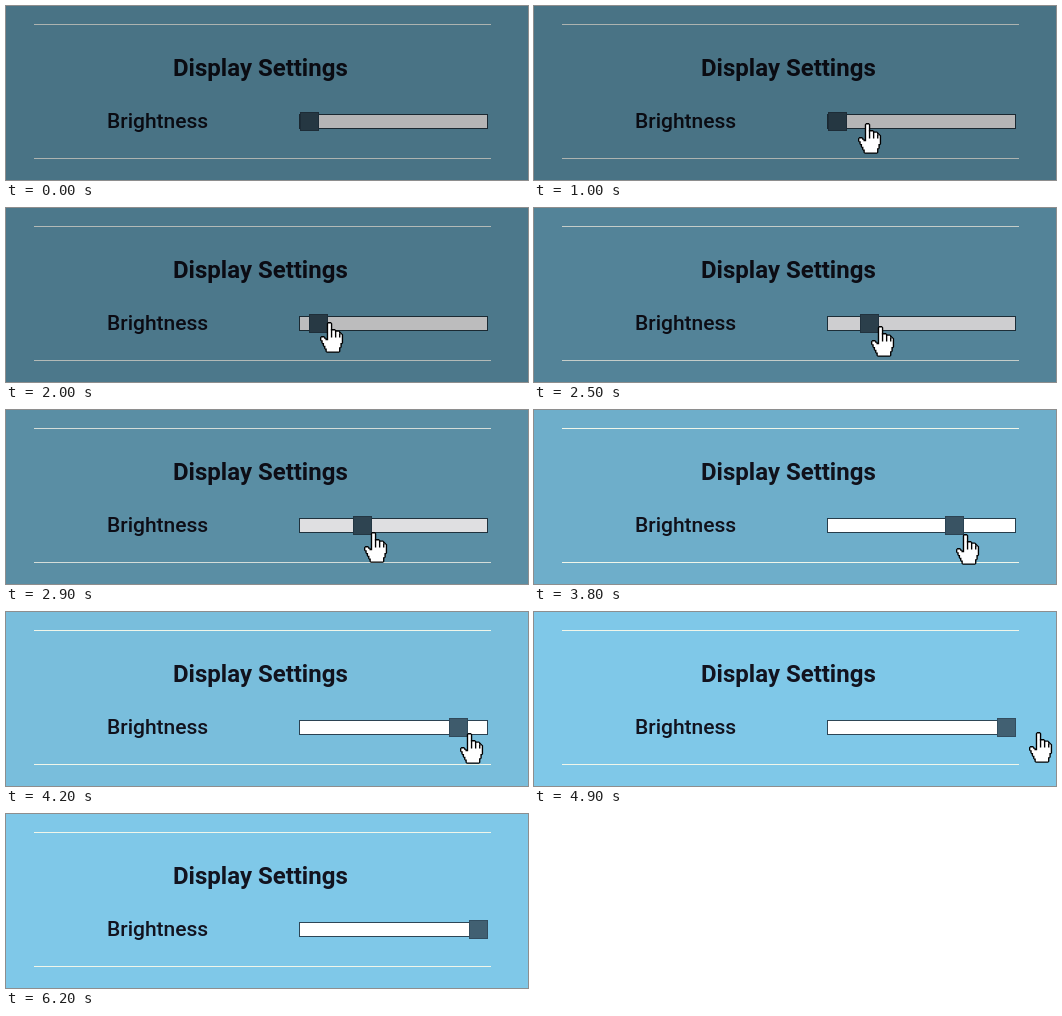
An HTML page for the animation above (6.9 s loop, 522 by 174 pixels).

```html
<!DOCTYPE html>
<html lang="en">
<head>
<meta charset="utf-8">
<title>Display Settings</title>
<style>
  html, body { margin: 0; width: 100%; height: 100%; overflow: hidden; }
  svg { display: block; width: 522px; height: 174px; }
  text { font-family: Roboto, "Liberation Sans", sans-serif; }
  #title { font-size: 24px; font-weight: 700; }
  #label { font-size: 21px; font-weight: 500; }
</style>
</head>
<body>
<svg viewBox="0 0 522 174">
  <rect id="back" width="522" height="174"/>
  <g id="lines">
    <rect x="28" y="18" width="457" height="1"/>
    <rect x="28" y="152" width="457" height="1"/>
  </g>
  <g id="words">
    <text id="title" x="167" y="69.5">Display Settings</text>
    <text id="label" x="101" y="122">Brightness</text>
  </g>
  <rect id="track" x="293.5" y="108.5" width="188" height="14"/>
  <rect id="knob" y="106.5" width="18" height="18"/>
  <g id="hand">
    <g transform="scale(1.36 1.4)">
      <path fill="#fff" stroke="#000" stroke-width="2" stroke-linejoin="bevel" paint-order="stroke"
        d="M6 1H8V6H11V7H14V8H15V9H16V15H15V18H14V21H5V19H4V17H3V15H2V13H1V11H3V12H4V13H6Z"/>
      <path fill="none" stroke="#000" d="M8.5 5V11M11.5 6V11M14.5 8V11"/>
    </g>
  </g>
</svg>
<script>
const LOOP = 6900, STEP = 100;
const ENTER = 100, GRAB = 1500, LEAVE = 6100;
const KNOB_MIN = 294, KNOB_MAX = 463, GRIP = 11;

// time, x, y of the pointer
const path = [
  [100, 480, 165], [700, 384, 128], [1200, 304, 114], [1500, 304, 114],
  [2000, 314, 114], [2900, 358, 122], [3500, 397, 126], [4200, 454, 121],
  [4900, 495, 120], [5400, 495, 120], [6100, 495, 174]
];

const el = id => document.getElementById(id);
const clamp = (v, lo, hi) => Math.min(hi, Math.max(lo, v));

// Slope of one axis at a key; zero where the pointer rests
function slope(i, axis) {
  const a = path[Math.max(0, i - 1)], b = path[i], c = path[Math.min(path.length - 1, i + 1)];
  const rests = p => p !== b && p[1] === b[1] && p[2] === b[2];
  return rests(a) || rests(c) ? 0 : (c[axis] - a[axis]) / (c[0] - a[0]);
}

function pointer(t, axis) {
  t = clamp(t, path[0][0], path[path.length - 1][0]);
  const i = Math.max(0, path.findIndex(p => p[0] >= t) - 1);
  const a = path[i], b = path[i + 1];
  const d = b[0] - a[0], u = (t - a[0]) / d, v = 1 - u;
  return v * v * (1 + 2 * u) * a[axis] + u * u * (3 - 2 * u) * b[axis]
    + d * u * v * (v * slope(i, axis) - u * slope(i + 1, axis));
}

function shade(rgb, light, max = [255, 255, 255]) {
  return `rgb(${rgb.map((c, i) => Math.round(Math.min(max[i], c * light)))})`;
}

function paint(id, name, value) {
  el(id).setAttribute(name, value);
}

function draw(t) {
  const x = Math.round(pointer(t, 1)), y = Math.round(pointer(t, 2));
  const knob = t < GRAB ? KNOB_MIN : clamp(x - GRIP, KNOB_MIN, KNOB_MAX);
  const light = 0.575 + 0.425 * (knob - KNOB_MIN) / (KNOB_MAX - KNOB_MIN);

  paint("back", "fill", shade([127, 200, 232], light));
  paint("lines", "fill", shade([300, 312, 306], light, [240, 246, 234]));
  paint("words", "fill", shade([18, 19, 31], light));
  paint("track", "fill", shade([315, 315, 317], light));
  paint("track", "stroke", shade([45, 70, 86], light));
  paint("knob", "x", knob + 0.5);
  paint("knob", "fill", shade([65, 96, 114], light));
  paint("knob", "stroke", shade([50, 77, 95], light));
  paint("hand", "transform", `translate(${x} ${y})`);
  paint("hand", "visibility", t >= ENTER && t < LEAVE ? "visible" : "hidden");
}

const start = performance.now();
function tick() {
  const t = (performance.now() - start) % LOOP;
  draw(Math.floor(t / STEP) * STEP);
  requestAnimationFrame(tick);
}
tick();
</script>
</body>
</html>
```
